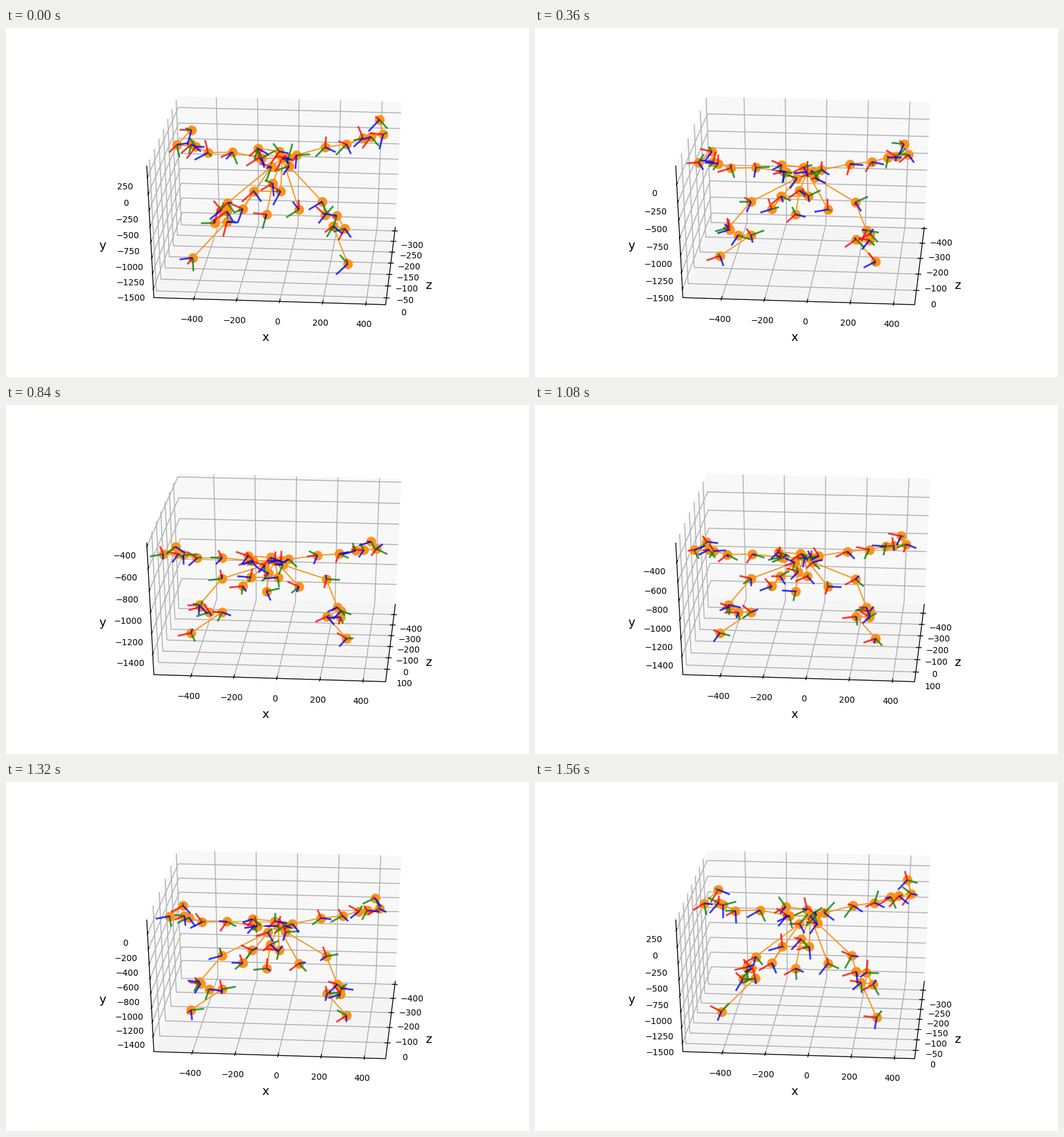
These frames come from a looping animation (857 by 571 pixels, 1.68 s). A matplotlib script:

```python
import numpy as np
import matplotlib.pyplot as plt
from matplotlib.animation import FuncAnimation
from matplotlib.collections import LineCollection, PolyCollection

W, H, DPI = 857, 571, 100
FRAMES, INTERVAL = 14, 120

# Standing skeleton in screen pixels, each limb from the trunk outwards.
STANDING = {
    "la": [(371, 203), (331, 204), (311, 194), (304, 190), (280, 191), (304, 167)],
    "ra": [(476, 208), (523, 195), (558, 190), (585, 180), (598, 178), (618, 174),
           (612, 150)],
    "t": [(413, 197), (415, 212), (419, 213), (448, 202), (453, 213), (463, 212),
          (435, 227), (464, 226)],
    "h": [(437, 254), (406, 267), (450, 267), (388, 296), (427, 305), (480, 297)],
    "ll": [(363, 286), (353, 298), (362, 300), (342, 319), (362, 317), (306, 376)],
    "rl": [(518, 284), (523, 306), (542, 307), (555, 328), (536, 324), (560, 386)],
}
BENT_LEGS = {
    "ll": [(354, 284), (317, 327), (319, 330), (333, 339), (354, 339), (303, 373)],
    "rl": [(525, 285), (543, 331), (549, 337), (548, 347), (526, 346), (558, 382)],
}
CHAINS = [
    "t1 la0 la1 la2 la3", "la2 la4 la5", "ra0 ra1 ra2 ra3 ra4", "ra3 ra5 ra6",
    "t0 t3 t5 ra0", "t1 t2 t4 t3", "t4 t5 t7", "t4 t6",
    "t6 ll0 ll1 ll2 ll3 ll4 ll5", "t7 rl0 rl1 rl2 rl3 rl4 rl5",
    "t4 h0 h4", "h0 h2", "t4 h2 h1 h3", "t6 h3", "t4 h5",
]

# Corners of the unit box (z = 0 in front) and where they appear on screen.
CORNERS = {
    (0, 0, 0): (242, 441), (1, 0, 0): (622, 453), (1, 0, 1): (638, 325),
    (0, 0, 1): (290, 316), (0, 1, 0): (231, 225), (0, 1, 1): (281, 112),
    (1, 1, 1): (648, 121),
}
ORANGE = "#ff9119"
TRIAD = ["red", "green", "blue"]


def solve_camera():
    rows, rhs = [], []
    for p, (u, v) in CORNERS.items():
        q = np.array([*p, 1.0])
        rows.append([*q, 0, 0, 0, 0, *(-u * q[:3])])
        rows.append([0, 0, 0, 0, *q, *(-v * q[:3])])
        rhs += [u, v]
    m = np.linalg.lstsq(np.array(rows), np.array(rhs, float), rcond=None)[0]
    return np.append(m, 1).reshape(3, 4)


CAMERA = solve_camera()


def project(*points):
    q = np.c_[np.array(points, float), np.ones(len(points))] @ CAMERA.T
    return q[:, :2] / q[:, 2:]


NAMES = [f"{part}{k}" for part, pts in STANDING.items() for k in range(len(pts))]
BONES = [[NAMES.index(n) for n in chain.split()] for chain in CHAINS]


def crouch(frame, lag=0.0):
    """0 when upright, 1 at the deepest point halfway through the loop."""
    return abs(np.sin(np.pi * (frame - lag) / FRAMES)) ** 1.3


def pose(frame):
    s = crouch(frame)
    bend = np.clip(s / 0.55, 0, 1)
    bend = bend * bend * (3 - 2 * bend)
    joints = []
    for part, points in STANDING.items():
        p = np.array(points, float)
        if part in BENT_LEGS:
            p += bend * (np.array(BENT_LEGS[part]) - p)
        else:
            # The higher a joint is, the further it sinks.
            drop = 0.5 * s * np.maximum(297 - p[:, 1], 0)
            lean = -0.3 + 0.0007 * (p[:, 0] - 450)
            p += np.c_[lean * drop, drop]
        joints.append(p)
    return np.concatenate(joints)


def axis_limits(frame):
    s = crouch(frame, lag=0.2)
    return np.array([[-587 + 13 * s, 491 + 13 * s],
                     [-1650 + 50 * s, 425 - 795 * s ** 2.2],
                     [-316 - 189 * s, 28 + 178 * s ** 1.66]])


def ticks(lo, hi, step):
    pad = 0.0175 * (hi - lo)
    return np.arange(np.ceil((lo + pad) / step) * step, hi - pad, step)


fig = plt.figure(figsize=(W / DPI + 1e-9, H / DPI + 1e-9), dpi=DPI, facecolor="white")
ax = fig.add_axes([0, 0, 1, 1])


def lines(segments, z, **style):
    ax.add_collection(LineCollection(segments, zorder=z, **style))


def draw_box(limits):
    (x0, x1), (y0, y1), (z0, z1) = limits
    panes = [project((0, 0, 0), (0, 0, 1), (0, 1, 1), (0, 1, 0)),
             project((0, 0, 0), (1, 0, 0), (1, 0, 1), (0, 0, 1)),
             project((0, 0, 1), (1, 0, 1), (1, 1, 1), (0, 1, 1))]
    ax.add_collection(PolyCollection(panes, zorder=0, linewidths=0,
                                     facecolors=["#f9f9f9", "#f5f5f5", "#f8f8f8"]))
    grid, marks = [], []

    def label(value, at, dx, dy):
        text = f"{value:.0f}".replace("-", "\u2212") if value else "0"
        ax.text(at[0] + dx, at[1] + dy, text, fontsize=10, ha="center", va="center")

    for v in ticks(x0, x1, 200):
        u = (v - x0) / (x1 - x0)
        grid.append(project((u, 0, 0), (u, 0, 1), (u, 1, 1)))
        marks.append(project((u, 0, -0.02), (u, 0, 0.03)))
        label(v, grid[-1][0], -3.5, 33.5)
    for v in ticks(y0, y1, 250 if y1 - y0 > 1850 else 200):
        u = (v - y0) / (y1 - y0)
        grid.append(project((0, u, 0), (0, u, 1), (1, u, 1)))
        marks.append(project((0, u, -0.015), (0, u, 0.025)))
        label(v, grid[-1][0], -36.5, 15.5)
    for v in ticks(z0, z1, 50 if z1 - z0 < 465 else 100):
        u = (z1 - v) / (z1 - z0)
        grid.append(project((1, 0, u), (0, 0, u), (0, 1, u)))
        marks.append(project((0.987, 0, u), (1.013, 0, u)))
        label(v, grid[-1][0], 28, 24)

    lines(grid, 1, colors="#b0b0b0", linewidths=1.1)
    spine = project((0, 1, 0), (0, 0, 0), (1, 0, 0), (1, 0, 1))
    lines([spine, *marks], 2, colors="black", linewidths=1)
    for name, x, y in [("x", 425.5, 506), ("y", 158.5, 356), ("z", 692, 421.5)]:
        ax.text(x, y, name, fontsize=14, ha="center", va="center")


def draw_body(joints, limits, frame):
    lines([joints[b] for b in BONES], 3, colors=ORANGE, linewidths=1.4)
    ax.plot(*joints.T, "o", ms=11.5, mew=0, color=ORANGE, zorder=4)

    # Every joint gets a fresh random orientation in each frame.
    rng = np.random.default_rng(40 + frame)
    rot = np.linalg.qr(rng.normal(size=(len(joints), 3, 3)))[0]
    basis = 65 * np.array([[372, 11], [0, -212], [-32, 126]])
    basis = basis / np.diff(limits, axis=1)
    for k, color in enumerate(TRIAD):
        tips = joints + rot[:, k] @ basis
        lines(np.stack([joints, tips], axis=1), 5 + k, colors=color,
              linewidths=2.1, alpha=0.78)


def update(frame):
    ax.clear()
    ax.set(xlim=(0, W), ylim=(H, 0))
    ax.axis("off")
    limits = axis_limits(frame)
    draw_box(limits)
    draw_body(pose(frame), limits, frame)


anim = FuncAnimation(fig, update, frames=FRAMES, interval=INTERVAL,
                     repeat=True, repeat_delay=0)
plt.show()
```
